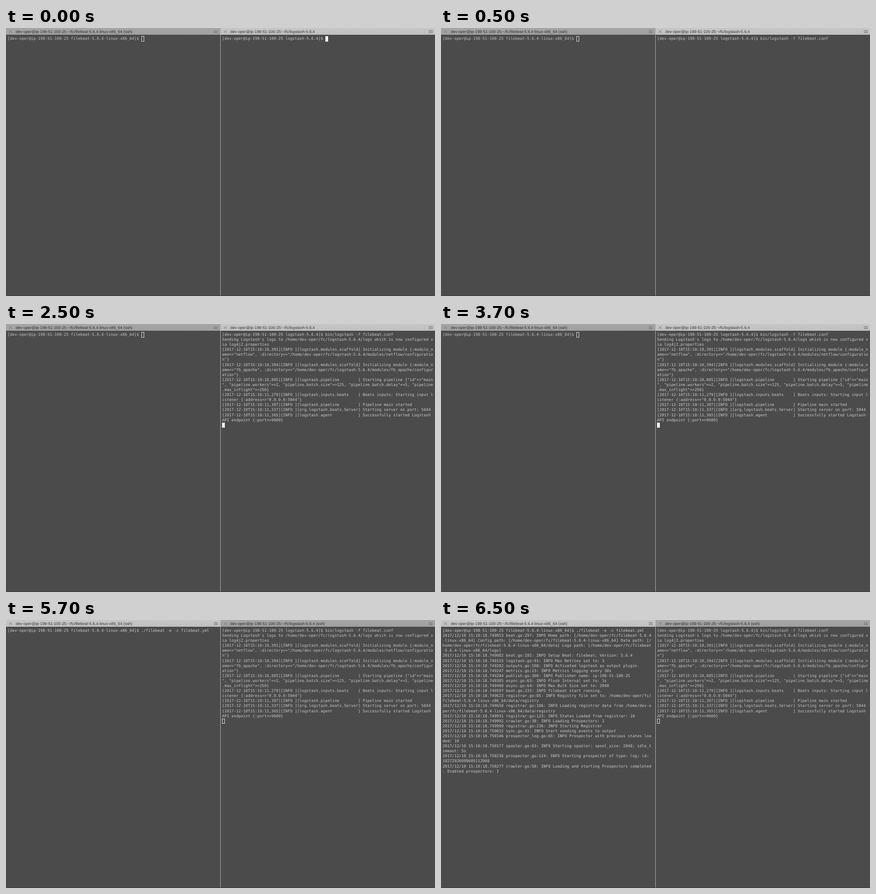
An HTML page that plays this animation: 947x592 px, repeating every 8 s.

```html
<!DOCTYPE html>
<html lang="en">
<head>
<meta charset="utf-8">
<title>Terminal panes</title>
<style>
html, body { margin: 0; width: 100%; height: 100%; overflow: hidden; background: #4b4b4b; }
#stage { position: relative; width: 947px; height: 592px; overflow: hidden; background: #4b4b4b; text-rendering: geometricPrecision; }
.pane { position: absolute; top: 0; height: 592px; }
.bar { position: absolute; left: 0; top: 0; width: 100%; height: 15px; background: linear-gradient(#a6a6a6, #9f9f9f); border-bottom: 1px solid #404040; }
.active .bar { background: linear-gradient(#c6c6c6, #c0c0c0); }
.title { position: absolute; left: 21.5px; top: 2px; font: 8.86px/12px "Liberation Sans", Arial, sans-serif; color: #303030; white-space: pre; }
.active .title { color: #3a3a3a; }
.bar svg { position: absolute; left: 0; top: 0; width: 100%; height: 15px; fill: none; stroke: #747474; }
.text { position: absolute; left: 3.6px; top: 19px; margin: 0; font: 8.6px/11.1px "DejaVu Sans Mono", monospace; color: #c4c4c4; }
.active .text { color: #cbcbcb; }
.cursor { position: absolute; box-sizing: border-box; width: 6px; height: 11.5px; border: 1px solid #e4e4e4; }
.active .cursor { background: #fff; border-color: #fff; }
#divider { position: absolute; left: 472.5px; top: 0; width: 1px; height: 592px; background: #b2b2b2; }
#foot { position: absolute; left: 0; bottom: 0; width: 100%; height: 1px; background: #403c3e; }
</style>
</head>
<body>
<div id="stage"></div>
<script>
const LOOP = 8000, CELL = 5.178, ROW = 11.1;
const USER = "dev-oper", HOST = "ip-198-51-100-25";
const BEAT = "filebeat-5.6.4-linux-x86_64", STASH = "logstash-5.6.4";
const HOME = `/home/${USER}/fc/`;
const stage = document.getElementById("stage");

const prompt = dir => `[${USER}@${HOST} ${dir}]$ `;
const title = dir => `${USER}@${HOST}:~/fc/${dir}`;
const wrap = (lines, cols) =>
  lines.flatMap(s => s.match(new RegExp(`.{1,${cols}}`, "g"))).join("\n");

const stashLog = (time, source, text) =>
  `[2017-12-10T15:10:${time}][INFO ][${source.padEnd(25)}] ${text}`;
const beatLog = (micros, source, text) =>
  `2017/12/10 15:10:18.${micros} ${source}: INFO ${text}`;

const stashCmd = prompt(STASH) + "bin/logstash -f filebeat.conf";
const beatCmd = prompt(BEAT) + "./filebeat -e -c filebeat.yml";

const stashOut = wrap([
  stashCmd,
  `Sending Logstash's logs to ${HOME}${STASH}/logs which is now configured via log4j2.properties`,
  ...[["391", "netflow"], ["394", "fb_apache"]].map(([ms, name]) =>
    stashLog("10," + ms, "logstash.modules.scaffold",
      `Initializing module {:module_name=>"${name}", :directory=>"${HOME}${STASH}/modules/${name}/configuration"}`)),
  stashLog("10,805", "logstash.pipeline", 'Starting pipeline {"id"=>"main", "pipeline.workers"=>2, "pipeline.batch.size"=>125, "pipeline.batch.delay"=>5, "pipeline.max_inflight"=>250}'),
  stashLog("11,279", "logstash.inputs.beats", 'Beats inputs: Starting input listener {:address=>"0.0.0.0:5044"}'),
  stashLog("11,307", "logstash.pipeline", "Pipeline main started"),
  stashLog("11,337", "org.logstash.beats.Server", "Starting server on port: 5044"),
  stashLog("11,365", "logstash.agent", "Successfully started Logstash API endpoint {:port=>9600}")
], 90).replace("\n API", "\nAPI") + "\n";

const root = HOME + BEAT;
const beatOut = wrap([
  beatCmd,
  ...[
    ["749053", "beat.go:297", `Home path: [${root}] Config path: [${root}] Data path: [${root}/data] Logs path: [${root}/logs]`],
    ["749082", "beat.go:192", "Setup Beat: filebeat; Version: 5.6.4"],
    ["749155", "logstash.go:91", "Max Retries set to: 3"],
    ["749202", "outputs.go:108", "Activated logstash as output plugin."],
    ["749247", "metrics.go:23", "Metrics logging every 30s"],
    ["749284", "publish.go:300", "Publisher name: " + HOST],
    ["749385", "async.go:63", "Flush Interval set to: 1s"],
    ["749400", "async.go:64", "Max Bulk Size set to: 2048"],
    ["749597", "beat.go:233", "filebeat start running."],
    ["749623", "registrar.go:85", `Registry file set to: ${root}/data/registry`],
    ["749650", "registrar.go:106", `Loading registrar data from ${root}/data/registry`],
    ["749931", "registrar.go:123", "States Loaded from registrar: 10"],
    ["749992", "crawler.go:38", "Loading Prospectors: 1"],
    ["749999", "registrar.go:236", "Starting Registrar"],
    ["750032", "sync.go:41", "Start sending events to output"],
    ["750146", "prospector_log.go:65", "Prospector with previous states loaded: 10"],
    ["750177", "spooler.go:63", "Starting spooler: spool_size: 2048; idle_timeout: 5s"],
    ["750236", "prospector.go:124", "Starting prospector of type: log; id: 18272926099605112968"],
    ["750277", "crawler.go:58", "Loading and starting Prospectors completed. Enabled prospectors: 1"]
  ].map(row => beatLog(...row))
], 89);

function add(parent, tag, cls) {
  const el = document.createElement(tag);
  el.className = cls;
  return parent.appendChild(el);
}

function makePane(x, width) {
  const el = add(stage, "div", "pane");
  el.style.left = x + "px";
  el.style.width = width + "px";
  const bar = add(el, "div", "bar");
  bar.innerHTML = `<svg><path d="M7 5l6 6m0-6l-6 6" stroke-width=".9"/>
    <path d="M${width - 14.5} 5.5h9m-9 2.5h9m-9 2.5h9" stroke-width="1"/></svg>`;
  return { el, title: add(bar, "div", "title"), text: add(el, "pre", "text"), cursor: add(el, "div", "cursor") };
}

function show(pane, name, text, cursor, active) {
  pane.el.classList.toggle("active", active);
  pane.title.textContent = name;
  pane.text.textContent = text;
  const lines = text.split("\n");
  pane.cursor.style.display = cursor ? "block" : "none";
  pane.cursor.style.left = 3.6 + lines[lines.length - 1].length * CELL + "px";
  pane.cursor.style.top = 18 + (lines.length - 1) * ROW + "px";
}

const left = makePane(0, 473), right = makePane(473.5, 473.5);
add(stage, "div", "").id = "divider";
add(stage, "div", "").id = "foot";

// start, left text, left cursor, right text, right cursor, focus on the left
const steps = [
  [0, prompt(BEAT), true, prompt(STASH), true, false],
  [500, prompt(BEAT), true, stashCmd, false, false],
  [2500, prompt(BEAT), true, stashOut, true, false],
  [4500, beatCmd, false, stashOut, true, true],
  [6500, beatOut, false, stashOut, true, true]
];

let current;
function draw(now) {
  const t = now % LOOP;
  const step = steps.filter(s => s[0] <= t).pop();
  if (step !== current) {
    current = step;
    const [, leftText, leftCursor, rightText, rightCursor, leftFocus] = step;
    show(left, title(BEAT) + " (ssh)", leftText, leftCursor, leftFocus);
    show(right, title(STASH) + (leftFocus ? " (ssh)" : ""), rightText, rightCursor, !leftFocus);
  }
}

const begin = performance.now();
function tick() {
  draw(performance.now() - begin);
  requestAnimationFrame(tick);
}
tick();
</script>
</body>
</html>
```
